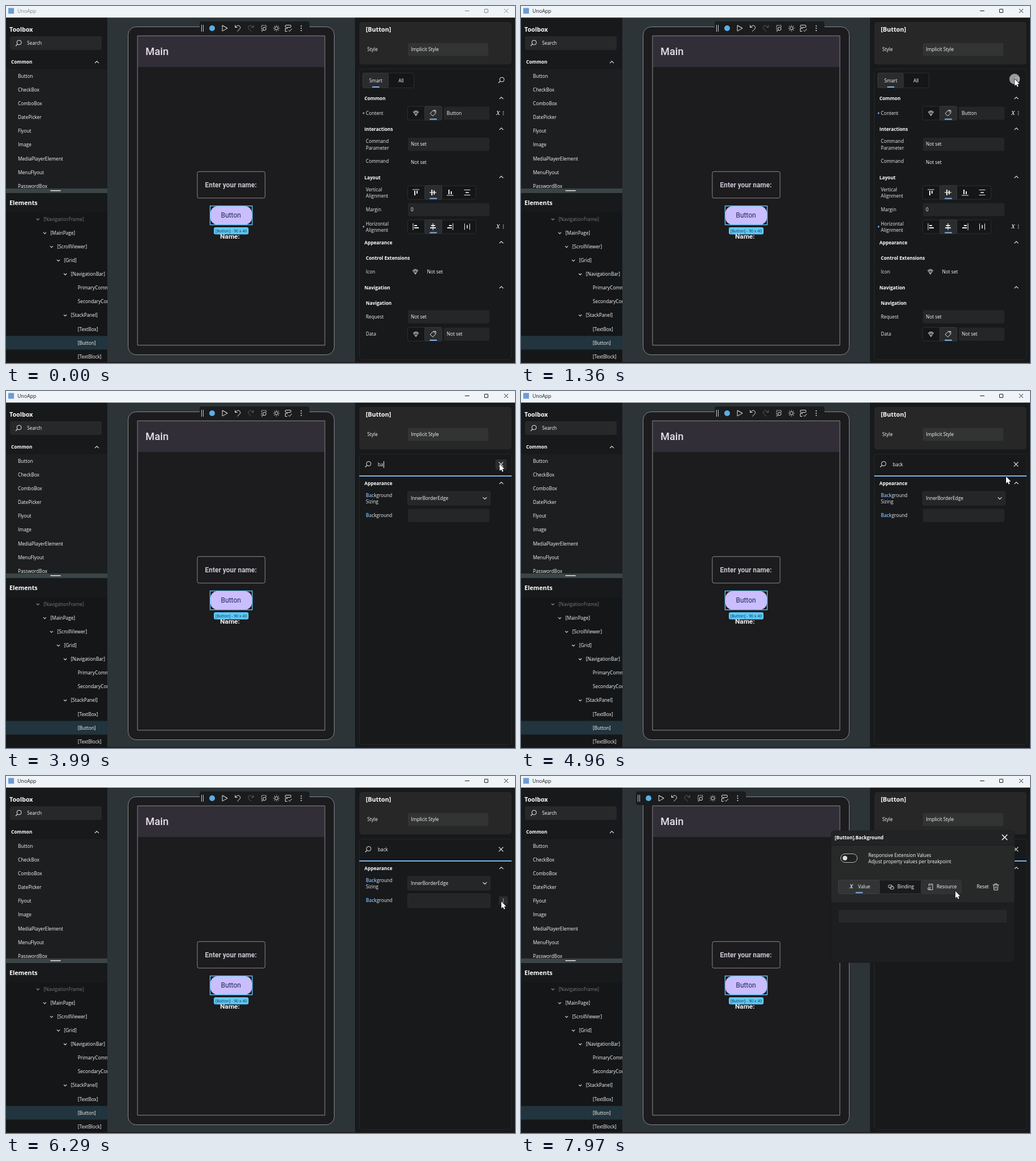
An HTML page with a canvas that plays this animation: 894 by 626 pixels, repeating every 7990 ms.

```html
<!DOCTYPE html>
<html lang="en">
<head>
<meta charset="utf-8">
<title>UnoApp designer</title>
<style>
html, body { margin: 0; width: 100%; height: 100%; overflow: hidden; background: #17191b; }
canvas { display: block; width: 894px; height: 626px; }
</style>
</head>
<body>
<canvas id="stage" width="894" height="626"></canvas>
<script>
const c = document.getElementById('stage').getContext('2d');
const LOOP = 7990;
const UI = '"Open Sans", sans-serif';
const DEVICE = 'Roboto, sans-serif';
const WHITE = '#fafafa', FIELD = '#242627', BLUE = '#7fb2ee', LINE = '#2c2e30';

// ---- helpers ----
function box(x, y, w, h, fill, r = 0, stroke) {
  c.beginPath();
  c.roundRect(x, y, w, h, r);
  if (fill) { c.fillStyle = fill; c.fill(); }
  if (stroke) { c.strokeStyle = stroke; c.lineWidth = 1; c.stroke(); }
}

// y is the vertical centre of the capitals
function text(s, x, y, { size = 8.25, weight = 500, color = WHITE, family = UI, align = 'left' } = {}) {
  c.font = `${weight} ${size}px ${family}`;
  c.fillStyle = color;
  c.textAlign = align;
  c.fillText(s, x, y + size * 0.357);
}
const bold = (s, x, y, size = 8.25) => text(s, x, y, { size, weight: 700, color: '#fff' });
const variable = (x, y) =>
  text('x', x, y - 1, { size: 12, weight: 'italic 400', family: '"Noto Serif", serif' });

function line(points, color = '#d8d8d8', width = 1) {
  c.beginPath();
  points.forEach(([x, y], i) => i ? c.lineTo(x, y) : c.moveTo(x, y));
  c.strokeStyle = color;
  c.lineWidth = width;
  c.stroke();
}

function arc(x, y, r, color = '#d8d8d8', a = 0, b = Math.PI * 2, width = 1) {
  c.beginPath();
  c.arc(x, y, r, a, b);
  c.strokeStyle = color;
  c.lineWidth = width;
  c.stroke();
}

function dot(x, y, r, color) {
  c.beginPath();
  c.arc(x, y, r, 0, Math.PI * 2);
  c.fillStyle = color;
  c.fill();
}

function clipped(x, y, w, h, draw) {
  c.save();
  c.beginPath();
  c.rect(x, y, w, h);
  c.clip();
  draw();
  c.restore();
}

function at(x, y, draw, angle = 0) {
  c.save();
  c.translate(x, y);
  c.rotate(angle);
  draw();
  c.restore();
}

// ---- icons ----
const chevron = (x, y, dir, color = '#e4e4e4', s = 3.4) =>
  line([[x - s, y - dir * s / 2], [x, y + dir * s / 2], [x + s, y - dir * s / 2]], color, 1.2);

function cross(x, y, s, color, width = 1.2) {
  line([[x - s, y - s], [x + s, y + s]], color, width);
  line([[x + s, y - s], [x - s, y + s]], color, width);
}

function magnifier(x, y) {
  arc(x + 1, y - 1, 4, '#e8e8e8');
  line([[x - 1.9, y + 1.9], [x - 5, y + 5]], '#e8e8e8', 1.1);
}

function dots(x, y, gap = 2.6, r = 0.8, color = '#cfcfcf') {
  for (let i = -1; i <= 1; i++) dot(x, y + i * gap, r, color);
}

function gem(x, y) {
  at(x, y, () => {
    line([[-4.5, -2], [-2.5, -4], [2.5, -4], [4.5, -2], [0, 4.5], [-4.5, -2], [4.5, -2]], '#c8c8c8', 0.9);
    line([[-2, -2], [0, 4], [2, -2], [0, -4], [-2, -2]], '#c8c8c8', 0.8);
  });
}

function tag(x, y) {
  at(x, y, () => {
    line([[0.3, -4.8], [4.8, -4.8], [4.8, -0.3], [-0.4, 5], [-5, 0.4], [0.3, -4.8], [4.8, -4.8]], '#e8e8e8');
    dot(2.4, -2.4, 0.8, '#e8e8e8');
  });
}

function alignIcon(x, y, kind, turned) {
  at(x, y, () => {
    const bar = (bx, by, w, h) => box(bx, by, w, h, '#ececec');
    if (kind === 3) {
      bar(-5.5, -5, 11, 1); bar(-3, -0.7, 6, 1.6); bar(-5.5, 4, 11, 1);
    } else if (kind === 1) {
      bar(-6, -0.6, 12, 1.2); bar(-3, -5, 2, 10); bar(1, -3.5, 2, 7);
    } else {
      const s = kind ? -1 : 1;
      bar(-6, s > 0 ? -5.5 : 4.5, 12, 1);
      bar(-3, s > 0 ? -3 : -5, 2, 8);
      bar(1, s > 0 ? -3 : -2, 2, 5);
    }
  }, turned ? -Math.PI / 2 : 0);
}

function cursor(x, y) {
  at(x, y, () => {
    c.beginPath();
    [[0, 0], [0, 12], [2.8, 9.5], [4.7, 13.7], [6.6, 12.8], [4.8, 8.8], [8.5, 8.8]]
      .forEach(p => c.lineTo(...p));
    c.closePath();
    c.lineJoin = 'round';
    c.strokeStyle = '#111';
    c.lineWidth = 1.4;
    c.stroke();
    c.fillStyle = '#fff';
    c.fill();
  });
}

// ---- window frame and left side ----
function titleBar(active) {
  const ink = active ? '#1b1b1b' : '#85888b';
  box(0, 0, 894, 20.5, '#eff4f9');
  box(4, 3.5, 10, 10, '#6c9bd6');
  text('UnoApp', 20, 9, { size: 8.7, weight: 400, color: ink });
  line([[806, 8.5], [814, 8.5]], ink);
  box(840.5, 5.5, 6, 6, null, 0.5, ink);
  cross(878.5, 8.5, 3.5, ink, 1);
}

const TOOLS = ['Button', 'CheckBox', 'ComboBox', 'DatePicker', 'Flyout', 'Image',
  'MediaPlayerElement', 'MenuFlyout', 'PasswordBox'];
const TREE = [['[NavigationFrame]', 0], ['[MainPage]', 1], ['[ScrollViewer]', 2], ['[Grid]', 3],
  ['[NavigationBar]', 4], ['PrimaryCommands', 5, 1], ['SecondaryCommands', 5, 1], ['[StackPanel]', 4],
  ['[TextBox]', 5, 1], ['[Button]', 5, 1], ['[TextBlock]', 5, 1]];

function sidebar() {
  box(0, 20.5, 178, 606, '#17191b');
  box(0, 111, 178, 209, '#1c1e1f');
  bold('Toolbox', 6, 41, 10.7);
  box(7, 53, 161, 24, '#262829', 3);
  magnifier(22, 65);
  text('Search', 37, 65.5);
  bold('Common', 9, 98.5);
  chevron(159.5, 98.5, -1);
  clipped(0, 111, 178, 209, () => TOOLS.forEach((s, i) => text(s, 21, 123 + i * 24.1)));
  box(0, 320, 178, 8, '#3b4447');
  box(78, 323, 18, 1.5, '#e6e6e6');
  bold('Elements', 6, 345, 10.7);
  box(0, 362, 178, 264, '#141618');
  box(0, 578.5, 178, 24, '#22343d');
  clipped(0, 362, 178, 264, () => TREE.forEach(([s, depth, leaf], i) => {
    const x = 66 + depth * 12, y = 374 + i * 24.07;
    text(s, x, y, { color: i ? WHITE : '#77797b' });
    if (!leaf) chevron(x - 10, y, 1, i ? '#cfcfcf' : '#8b8d8f', 2.5);
  }));
}

// ---- middle ----
function device() {
  box(178, 20.5, 435, 606, '#2c3438');
  box(214.5, 36.5, 362, 575, '#1c1b1d', 14, '#858b8e');
  box(231, 52.3, 329, 542.5, '#1c1b1d', 0, '#8d8d90');
  box(232, 53, 327, 54, '#322e38');
  text('Main', 245, 79.5, { size: 18.2, family: DEVICE, color: '#e6e1e5' });
  box(336, 290.3, 119, 46.5, null, 3, '#8b8790');
  text('Enter your name:', 395, 314, { size: 11.9, weight: 700, family: DEVICE, color: '#cac4d0', align: 'center' });
  text('Name:', 376, 404, { size: 11.8, weight: 700, family: DEVICE, color: '#f2eef3' });
  box(359, 351, 73, 32.5, '#cabeff', 12.5);
  text('Button', 395, 367, { size: 11.9, weight: 400, family: DEVICE, color: '#1f2458', align: 'center' });
  c.strokeStyle = '#5cc8f8';
  c.lineWidth = 1.4;
  c.strokeRect(358.5, 350.6, 74, 33);
  box(365, 388, 61, 12.5, '#5cc8f8', 3);
  text('[Button] - 90 x 40', 395.5, 394.5, { size: 6.9, weight: 400, color: '#123245', align: 'center' });
}

function toolbar(x) {
  at(x, 39, () => {
    box(0, -12, 193, 24, '#1a1c1d', 4);
    box(3, -6, 1, 12, '#c8c8c8');
    box(6, -6, 1, 12, '#c8c8c8');
    dot(22, 0, 5, '#5aaee6');
    line([[40, -5], [49, 0], [40, 5], [40, -5], [49, 0]], '#e0e0e0');
    [[67, 1, '#e0e0e0'], [90, -1, '#5c5e60']].forEach(([cx, s, color]) => {
      c.save();
      c.translate(cx, 0);
      c.scale(s, 1);
      line([[-4.5, -5.5], [-4.5, -1.5], [-0.5, -1.5]], color);
      line([[-4.5, -1.5], [-2, -4]], color);
      arc(0.8, -1.2, 3.7, color, -2.4, 0.8);
      line([[3.5, 1.3], [-0.8, 5.5]], color);
      c.restore();
    });
    c.setLineDash([2, 1]);
    line([[109, 4], [109, -5], [117, -5], [117, -1]], '#e0e0e0');
    c.setLineDash([]);
    arc(114, 1, 2.8, '#e0e0e0');
    line([[112, 3], [109, 6]], '#e0e0e0');
    arc(135, 0, 2.8, '#e0e0e0');
    for (let i = 0; i < 8; i++) at(135, 0, () => line([[4.2, 0], [5.6, 0]], '#e0e0e0'), i * Math.PI / 4);
    box(150.5, -5.5, 10, 4, null, 1.5, '#e0e0e0');
    line([[155, 0.5], [150.5, 0.5], [150.5, 5.5], [154, 5.5]], '#e0e0e0');
    line([[156, 3.5], [158, 5.5], [162, 1]], '#e0e0e0');
    dots(178.5, 0, 4, 1, '#e8e8e8');
  });
}

// ---- property panel ----
function section(s, y) {
  bold(s, 629.5, y + 0.5);
  chevron(870, y - 0.5, -1);
}

function field(y, s = '', x = 706) {
  box(x, y - 11.5, 849 - x, 23, FIELD, 2);
  text(s, x + 5, y);
}

function combo(y, s) {
  box(705.5, y - 12, 145, 24, FIELD, 2, '#292b2d');
  text(s, 711, y);
  chevron(841, y, 1);
}

function segments(y, count, draw) {
  box(705.5, y - 12, count * 30, 24, '#141618', 3, LINE);
  box(735.5, y - 12, 30, 24, '#2a2c2e', 2, '#36383a');
  for (let i = 0; i < count; i++) draw(720 + i * 30, i);
  box(744, y + 9.5, 13, 2, BLUE, 1);
}

const sources = y => segments(y, 2, (x, i) => (i ? tag : gem)(x, y));
const aligns = (y, turned) => segments(y, 4, (x, i) => alignIcon(x, y, i, turned));

// Label lines around y with every match of the query tinted
function label(s, y, query = '') {
  const rows = s.split('\n');
  rows.forEach((row, i) => {
    const parts = query ? row.split(new RegExp(`(${query})`, 'gi')) : [row];
    let x = 632;
    parts.forEach(part => {
      const hit = query && part.toLowerCase() === query;
      text(part, x, y + (i - (rows.length - 1) / 2) * 11.5,
        { color: hit ? '#86bdf8' : '#ececec', weight: hit ? 600 : 500 });
      x += c.measureText(part).width;
    });
  });
}

function changed(y) {
  dot(628, y, 1.4, BLUE);
  variable(861, y);
  dots(873.5, y);
}

function checkbox(y, on) {
  box(711.5, y - 7, 14, 14, on ? BLUE : '#17191b', 2, on ? BLUE : '#9a9c9e');
  if (on) line([[715, y], [717.5, y + 2.5], [722, y - 2]], '#22344a');
}

function panelBase() {
  box(613, 20.5, 281, 606, '#17191b');
  box(620.5, 28, 267.5, 74.5, '#272727', 5);
  bold('[Button]', 632, 41.5, 10.7);
  text('Style', 634.5, 76);
  box(706, 65, 141, 22.5, '#323434', 2);
  text('Implicit Style', 711.5, 76);
  box(620.5, 110.5, 267.5, 509.5, '#17191b', 5, '#26282a');
}

function tabs() {
  box(626.5, 117.5, 90, 26, '#141618', 3, LINE);
  box(626.5, 117.5, 45, 26, '#2a2c2e', 3, '#343638');
  text('Smart', 649.5, 131, { align: 'center' });
  text('All', 694, 131, { align: 'center' });
  box(643, 141, 13, 2, BLUE, 1);
  magnifier(870, 130);
}

function smartList() {
  section('Common', 162);
  label('Content', 188); sources(188); field(188, 'Button', 769); changed(188);
  section('Interactions', 216);
  label('Command\nParameter', 243); field(242.5, 'Not set');
  label('Command', 272.5); text('Not set', 711, 274);
  section('Layout', 300.5);
  label('Vertical\nAlignment', 327.5); aligns(327, false);
  label('Margin', 357); field(357, '0');
  label('Horizontal\nAlignment', 387.5); aligns(387, true); changed(387);
  section('Appearance', 415);
  bold('Control Extensions', 632, 442);
  label('Icon', 466); gem(719, 466); text('Not set', 739.5, 466);
  section('Navigation', 494);
  bold('Navigation', 632, 521);
  label('Request', 545); field(545, 'Not set');
  label('Data', 575.5); sources(575.5); field(575.5, 'Not set', 769);
}

const FLAGS = [['Is Tap Enabled'], ['Is Tab Stop', 1], ['Is Right Tap\nEnabled'], ['Is Holding Enab\nled'],
  ['Is Hit Test Visib\nle', 1], ['Is Double Tap\nEnabled'], ['Allow Focus\nWhen Disabled'], ['Is Enabled', 1]];

function wideResults() {
  section('Interactions', 162);
  label('Tab Index', 188, 'b'); field(188, '2147483647');
  FLAGS.forEach(([s, on], i) => {
    const y = 218.3 + i * 30.15;
    label(s, y, 'b');
    checkbox(Math.round(y), on);
  });
  section('Layout', 457.5);
  label('Visibility', 483.5, 'b'); combo(483.5, 'Visible');
  section('Appearance', 511.5);
  label('Border\nThickness', 538, 'b'); field(538, '0');
  label('Border Brush', 568, 'b'); field(568);
  label('Background\nSizing', 598.5, 'b'); combo(598, 'InnerBorderEdge');
  clipped(621, 610, 266, 9.5, () => field(628));
  box(882.7, 161, 1.6, 346, '#929496', 1);
}

function backResults(query, hover, bright) {
  section('Appearance', 162);
  label('Background\nSizing', 188.8, query); combo(188, 'InnerBorderEdge');
  label('Background', 218.3, query); field(218.3);
  if (!hover) return;
  box(705.5, 206.5, 145, 24, FIELD, 2, '#292b2d');
  box(866, 211, 15.5, 15, '#2a2c2e', 2);
  dots(873.5, 218.5, 2.6, 0.8, bright ? '#cfcfcf' : '#8c8e90');
}

function searchBar(query, caret, hover) {
  box(621, 111, 266.5, 38, '#17191b', [5, 5, 0, 0]);
  magnifier(636, 128.5);
  text(query, 653, 129.5);
  const end = 653.5 + c.measureText(query).width;
  if (caret) box(end, 123, 1, 12, '#f4f4f4');
  if (hover) box(859.5, 120, 20, 18, '#2b2d2f', 3);
  cross(869.5, 128.5, 3.8, '#e8e8e8');
  box(620.5, 148, 267.5, 2, BLUE);
}

// ---- popup ----
function popup(resourceHover) {
  box(545, 96, 321.5, 231, '#1d1e1f', 5, '#17181a');
  box(545, 96, 321.5, 125.5, '#272828', [5, 5, 0, 0]);
  box(545, 96, 321.5, 25, '#222324', [5, 5, 0, 0]);
  box(545, 120.5, 321.5, 1, '#191a1b');
  bold('[Button].Background', 551, 108.5);
  cross(849.5, 107.5, 4.7, '#fff', 1.4);
  box(561.5, 136.5, 29, 15, '#1f2021', 7.5, '#b4b6b8');
  dot(569, 144, 4, '#dcdcdc');
  text('Responsive Extension Values', 610, 139, { color: '#fff' });
  text('Adjust property values per breakpoint', 610, 150.5);
  box(557.5, 182.5, 216, 24, '#1a1b1c', 3, '#353738');
  box(557.5, 182.5, 72, 24, '#323435', 3, '#3e4041');
  if (resourceHover) box(702, 183, 71.5, 23, '#303233', 3);
  variable(577, 194);
  text('Value', 592, 194.5);
  box(587.5, 203.5, 13, 2, BLUE, 1);
  at(650, 194.5, () => {
    box(-5, -3.5, 7, 5, null, 2.5, '#d8d8d8');
    box(-2, -1, 7, 5, null, 2.5, '#d8d8d8');
  });
  text('Binding', 661, 194.5);
  at(719, 194.5, () => {
    line([[-2.5, -1], [-2.5, -5], [4, -5], [4, 5], [-1, 5]]);
    line([[1, 1.5], [-4, 1.5], [-4, 5], [-1, 5], [-1, 1.5]]);
    line([[0, -2.5], [2, -2.5]]);
  });
  text('Resource', 730, 194.5);
  text('Reset', 800.5, 194.5);
  at(834, 194.5, () => {
    line([[-5.5, -3.5], [5.5, -3.5]]);
    line([[-2, -3.5], [-2, -5.5], [2, -5.5], [2, -3.5]]);
    line([[-4, -3.5], [-3.2, 5.5], [3.2, 5.5], [4, -3.5]]);
    line([[-1.2, -1], [-1.2, 3]]);
    line([[1.2, -1], [1.2, 3]]);
  });
  box(558, 234.5, 295.5, 22.5, '#272829', 2);
}

// ---- motion ----
const KEYS = [[1270, 867, 128], [4630, 867, 128], [4960, 852, 150], [5060, 852, 150], [5410, 862, 205],
  [5650, 868, 222], [5840, 868, 222], [6060, 870, 220], [7080, 870, 220], [7820, 784, 204], [7970, 763, 202]];

const bezier = (u, a, b, d, e) =>
  a * (1 - u) ** 3 + 3 * b * u * (1 - u) ** 2 + 3 * d * u * u * (1 - u) + e * u ** 3;

function pointer(t) {
  if (t < 1270) {
    const u = Math.sin((t - 520) / 750 * Math.PI / 2);
    return [bezier(u, 890, 640, 665, 867), bezier(u, 607, 540, 250, 128)];
  }
  const i = KEYS.findIndex(k => t < k[0]);
  if (i < 0) return KEYS[KEYS.length - 1].slice(1);
  const [t0, x0, y0] = KEYS[i - 1], [t1, x1, y1] = KEYS[i];
  let u = (t - t0) / (t1 - t0);
  if (t0 < 7080) u = u * u * (3 - 2 * u);
  return [x0 + (x1 - x0) * u, y0 + (y1 - y0) * u];
}

const TYPED = [[2760, 'b'], [3970, 'ba'], [4140, 'bac'], [4160, 'back']];
const caretOn = t => t < 1840 || (t >= 2330 && t < 4650) || (t >= 5140 && t < 5630);

function render(t) {
  const [x, y] = pointer(t);
  const query = TYPED.reduce((q, [start, s]) => t >= start ? s : q, '');
  const open = t >= 7030;

  titleBar(t >= 1360);
  sidebar();
  device();
  toolbar(t >= 7080 ? 202 : 340);
  panelBase();
  if (!query) smartList();
  else if (query === 'b') wideResults();
  else backResults(query, y > 207 && (!open || x > 866), t >= 6290);

  if (t < 1660) tabs();
  if (t >= 1360 && t < 1540) dot(867, 128, 9.3, 'rgba(190,190,190,0.78)');
  if (t >= 1540) {
    c.globalAlpha = Math.min(1, (t - 1510) / 150);
    searchBar(query, caretOn(t), x > 859 && y < 138);
    c.globalAlpha = 1;
  }
  if (open) popup(y < 207 && x > 702 && x < 774);
  box(0, 624.5, 894, 1.5, '#1e1b1b');
  if (t >= 520) cursor(x, y);
}

function tick(now) {
  render(now % LOOP);
  requestAnimationFrame(tick);
}
render(0);
requestAnimationFrame(tick);
</script>
</body>
</html>
```
